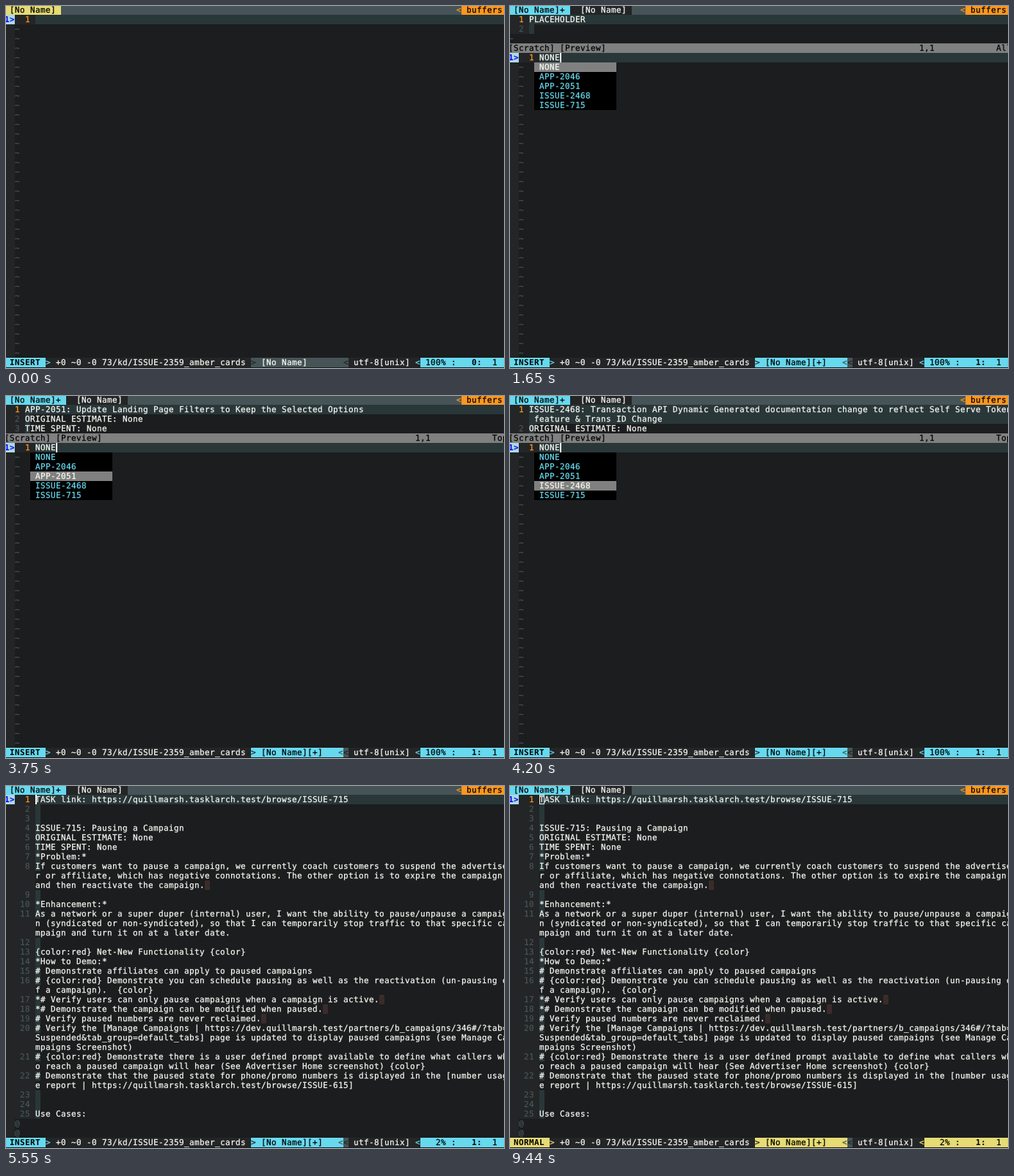
Recreate the animation shown at these times as an HTML page. Size 679 by 494 pixels, loop 9.49 s.

```html
<!DOCTYPE html>
<html lang="en">
<head>
<meta charset="utf-8">
<title>Editor completion</title>
<style>
  html, body { margin: 0; width: 100%; height: 100%; overflow: hidden; background: #1b1d1e; }
  svg { display: block; }
  text {
    font: 11px "DejaVu Sans Mono", "Liberation Mono", monospace;
    white-space: pre;
    text-rendering: geometricPrecision;
    stroke-width: .25px;
  }
  .bold { font-weight: bold; stroke-width: 0; }
</style>
</head>
<body>
<svg id="stage" width="679" height="494" viewBox="0 0 679 494"></svg>
<script>
(() => {
const CELL = 7, LINE = 13, COLS = 98, LAST_ROW = 37, LOOP = 9490;
const C = {
  bg: '#1b1d1e', fg: '#f8f8f2', gutter: '#232526', dim: '#465457', line: '#293739',
  orange: '#fd971f', cyan: '#66d9ef', yellow: '#e6db74', grey: '#808080',
  black: '#000', trail: '#3b2b2b', signBg: '#add8e6', signFg: '#0000f0'
};

const NS = 'http://www.w3.org/2000/svg';
const stage = document.getElementById('stage');
const colX = col => col * CELL - 2;
const rowY = row => row * LINE - 1;

function add(tag, attrs) {
  const el = document.createElementNS(NS, tag);
  for (const key in attrs) el.setAttribute(key, attrs[key]);
  return stage.appendChild(el);
}

function measureSpacing() {
  const probe = add('text', { x: 0, y: 0 });
  probe.textContent = 'M'.repeat(90);
  const spacing = CELL - probe.getComputedTextLength() / 90;
  probe.remove();
  return spacing;
}

const spacing = measureSpacing();

function fill(col, row, cols, color, rows = 1) {
  add('rect', { x: colX(col), y: rowY(row), width: cols * CELL, height: rows * LINE, fill: color });
}

function write(col, row, str, color = C.fg, bold = false) {
  const el = add('text', {
    x: colX(col), y: rowY(row) + 10, fill: color, stroke: color,
    'letter-spacing': spacing, class: bold ? 'bold' : ''
  });
  el.textContent = str;
}

function wrap(str, width) {
  const rows = [];
  for (let i = 0; i === 0 || i < str.length; i += width) rows.push(str.slice(i, i + width));
  return rows;
}

const TICKETS = ['NONE', 'APP-2046', 'APP-2051', 'ISSUE-2468', 'ISSUE-715'];
const TITLES = [
  'PLACEHOLDER',
  'APP-2046: Cancel Button on QVLN Campaign Selection Not Working',
  'APP-2051: Update Landing Page Filters to Keep the Selected Options',
  'ISSUE-2468: Transaction API Dynamic Generated documentation change to reflect Self Serve Token feature & Trans ID Change',
  'ISSUE-715: Pausing a Campaign'
];
const TIMES = ['ORIGINAL ESTIMATE: None', 'TIME SPENT: None'];
const LINK = 'https://quillmarsh.tasklarch.test/browse/ISSUE-';
const STORY = [
  'TASK link: ' + LINK + '715',
  '',
  '',
  TITLES[4],
  ...TIMES,
  '*Problem:*',
  'If customers want to pause a campaign, we currently coach customers to suspend the advertiser or affiliate, which has negative connotations. The other option is to expire the campaign and then reactivate the campaign. ',
  '',
  '*Enhancement:*',
  'As a network or a super duper (internal) user, I want the ability to pause/unpause a campaign (syndicated or non-syndicated), so that I can temporarily stop traffic to that specific campaign and turn it on at a later date.',
  '',
  '{color:red} Net-New Functionality {color}',
  '*How to Demo:*',
  '# Demonstrate affiliates can apply to paused campaigns',
  '# {color:red} Demonstrate you can schedule pausing as well as the reactivation (un-pausing of a campaign).  {color}',
  '*# Verify users can only pause campaigns when a campaign is active. ',
  '*# Demonstrate the campaign can be modified when paused. ',
  '# Verify paused numbers are never reclaimed. ',
  '# Verify the [Manage Campaigns | https://dev.quillmarsh.test/partners/b_campaigns/346#/?tab=Suspended&tab_group=default_tabs] page is updated to display paused campaigns (see Manage Campaigns Screenshot)',
  '# {color:red} Demonstrate there is a user defined prompt available to define what callers who reach a paused campaign will hear (See Advertiser Home screenshot) {color}',
  '# Demonstrate that the paused state for phone/promo numbers is displayed in the [number usage report | ' + LINK + '615]',
  '',
  '',
  'Use Cases:'
];

function drawTabs(modified) {
  fill(0, 0, COLS, C.dim);
  fill(0, 0, modified ? 12 : 11, modified ? C.cyan : C.yellow);
  write(1, 0, modified ? '[No Name]+' : '[No Name]', C.black);
  if (modified) {
    fill(12, 0, 12, C.gutter);
    write(14, 0, '[No Name]');
  }
  write(88, 0, '<', C.orange);
  fill(89, 0, 9, C.orange);
  write(90, 0, 'buffers', C.black);
}

function drawStatus(mode, accent, modified, percent, line) {
  const row = LAST_ROW;
  fill(0, row, COLS, C.gutter);
  fill(0, row, 8, accent);
  write(1, row, mode, C.black, true);
  write(8, row, '>', accent);
  write(10, row, '+0 ~0 -0 73/kd/ISSUE-2359_amber_cards');
  fill(48, row, 19, C.dim);
  if (modified) {
    fill(48, row, 18, accent);
    write(65, row, '<', C.dim);
  }
  write(48, row, '>', C.gutter);
  write(50, row, modified ? '[No Name][+]' : '[No Name]', modified ? C.black : C.fg);
  write(66, row, '<', C.gutter);
  write(68, row, 'utf-8[unix]');
  write(80, row, '<', accent);
  fill(81, row, 17, accent);
  write(82, row, percent.padStart(4) + ' :', C.black);
  write(91, row, line + ':', C.black, true);
  write(95, row, '1', C.black);
}

// Numbered, wrapped lines with cursor line and cursor column on the first one.
function drawLines(lines, row, end, gutter) {
  const width = COLS - gutter;
  lines.forEach((str, i) => {
    wrap(str, width).forEach((part, j) => {
      if (row >= end) return;
      fill(0, row, gutter, C.gutter);
      if (i === 0) fill(gutter, row, width, C.line);
      else if (j === 0) fill(gutter, row, 1, C.line);
      if (j === 0) write(gutter - 3, row, String(i + 1).padStart(2), i ? C.dim : C.orange);
      if (part.length < width && part.endsWith(' ')) fill(gutter + part.length - 1, row, 1, C.trail);
      write(gutter, row, part);
      row++;
    });
  });
  return row;
}

function drawSign(row) {
  fill(0, row, 2, C.signBg);
  write(0, row, '1>', C.signFg, true);
}

// Main window: one buffer, then filler marks down to the status bar.
function drawMain(lines, row, mark) {
  fill(0, row, 2, C.gutter, LAST_ROW - row);
  let next = drawLines(lines, row, LAST_ROW, 6);
  drawSign(row);
  for (; next < LAST_ROW; next++) write(2, next, mark, C.dim);
}

function drawPreview(sel) {
  const lines = sel ? [TITLES[sel], ...TIMES] : [TITLES[0], ''];
  const next = drawLines(lines, 1, 4, 4);
  if (next < 4) write(0, next, '~', C.dim);
  fill(0, 4, COLS, C.grey);
  write(0, 4, '[Scratch] [Preview]', C.black);
  write(80, 4, '1,1', C.black);
  write(95, 4, sel ? 'Top' : 'All', C.black);
}

function drawMenu(sel) {
  TICKETS.forEach((name, i) => {
    fill(5, 6 + i, 16, i === sel ? C.grey : C.black);
    write(6, 6 + i, name, i === sel ? C.fg : C.cyan);
  });
}

function drawCursor(kind, col, row) {
  if (kind === 'bar') {
    add('rect', { x: colX(col), y: rowY(row), width: 2, height: LINE, fill: C.fg });
  } else if (kind === 'block') {
    fill(col, row, 1, C.fg);
    write(col, row, STORY[0][0], C.bg);
  } else if (kind === 'hollow') {
    add('rect', {
      x: colX(col) + .5, y: rowY(row) + .5, width: CELL - 1, height: LINE - 1,
      fill: 'none', stroke: C.fg
    });
  }
}

const scenes = {
  empty(cursor) {
    drawTabs(false);
    drawMain([''], 1, '~');
    drawStatus('INSERT', C.cyan, false, '100%', 0);
    drawCursor(cursor, 6, 1);
  },
  menu(cursor, sel) {
    drawTabs(true);
    drawPreview(sel);
    drawMain(['NONE'], 5, '~');
    drawMenu(sel);
    drawStatus('INSERT', C.cyan, true, '100%', 1);
    drawCursor(cursor, 10, 5);
  },
  story(cursor, normal) {
    drawTabs(true);
    drawMain(STORY, 1, '@');
    drawStatus(normal ? 'NORMAL' : 'INSERT', normal ? C.yellow : C.cyan, true, '2%', 1);
    drawCursor(cursor, 6, 1);
  }
};

// start time, scene, cursor, selected item or normal mode
const steps = [
  [0, 'empty', ''],
  [300, 'empty', 'bar'],
  [1650, 'menu', 'bar', 0],
  [2400, 'menu', '', 0],
  [2550, 'menu', 'bar', 0],
  [2850, 'menu', 'bar', 1],
  [3600, 'menu', '', 1],
  [3750, 'menu', 'bar', 2],
  [4200, 'menu', 'bar', 3],
  [4650, 'menu', 'bar', 4],
  [5400, 'menu', '', 4],
  [5550, 'story', 'bar', false],
  [6300, 'story', '', false],
  [6450, 'story', 'bar', false],
  [6900, 'story', '', false],
  [7200, 'story', 'bar', false],
  [7340, 'story', 'block', true],
  [7940, 'story', '', true],
  [8240, 'story', 'block', true],
  [9440, 'story', 'hollow', true]
];

let shown = null;

function render(time) {
  const step = steps.filter(s => s[0] <= time).pop();
  if (step === shown) return;
  shown = step;
  stage.replaceChildren();
  fill(0, 0, COLS, C.bg, LAST_ROW + 2);
  scenes[step[1]](step[2], step[3]);
}

const start = performance.now();

function tick() {
  render(Math.max(0, performance.now() - start) % LOOP);
  requestAnimationFrame(tick);
}
tick();
})();
</script>
</body>
</html>
```
